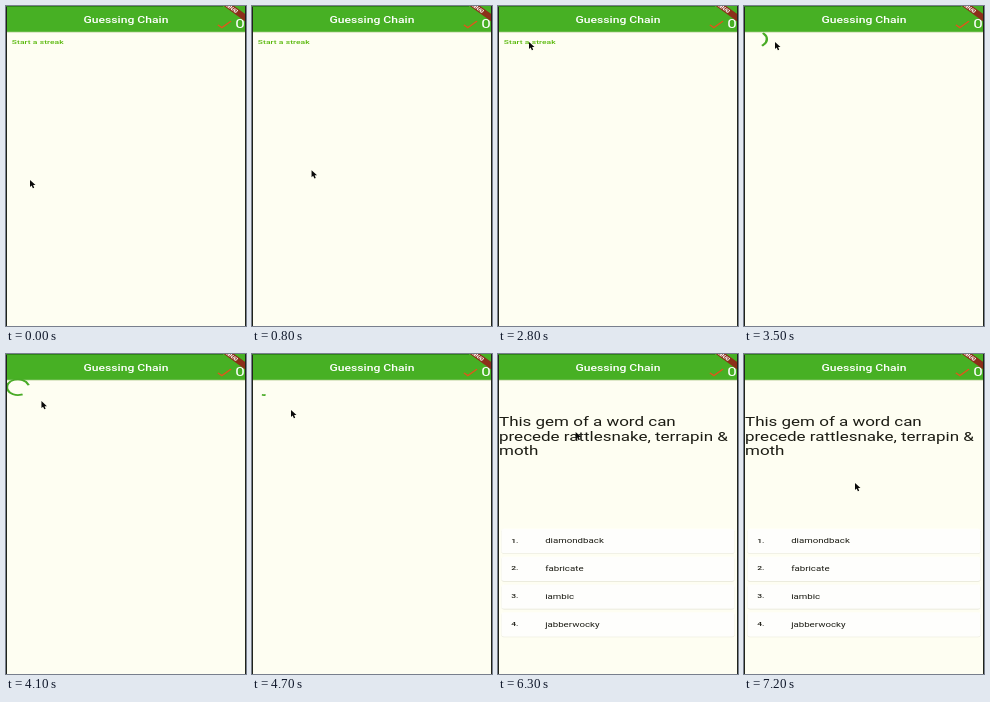
An HTML page for the animation above (8000 ms loop, 240x320 px).

```html
<!DOCTYPE html>
<html lang="en">
<head>
<meta charset="utf-8">
<title>Guessing Chain</title>
<style>
  html, body { margin: 0; width: 100%; height: 100%; overflow: hidden; background: #fefef2; }
  svg { display: block; }
  text { font-family: Roboto, "Open Sans", sans-serif; fill: #1c1c14; }
  .bar { fill: #fff; font-size: 20px; font-weight: 500; }
  .score { fill: #fff; font-size: 28px; }
  .start { fill: #58b80a; font-size: 14px; font-weight: 500; letter-spacing: .1px; }
  .clue { font-size: 28px; }
  .item { font-size: 16px; }
  .num { font-size: 14px; font-weight: 500; }
  .debug { fill: #fff; font-size: 10.2px; font-weight: 900; }
</style>
</head>
<body>
<svg width="240" height="320" viewBox="0 0 240 320">
  <!-- app layout in logical units -->
  <g transform="translate(1 1) scale(.607 .435)">
    <rect y="56" width="393" height="3" fill="#cfdfb4"/>
    <rect y="-3" width="393" height="60" fill="#47b024"/>
    <text class="bar" x="196" y="36.5" text-anchor="middle">Guessing Chain</text>
    <path transform="translate(342 24) scale(1.33)" fill="#e0561c"
      d="M9 16.17 4.83 12 3.41 13.41 9 19 21 7 19.59 5.59z"/>
    <text class="score" x="376" y="49">0</text>
    <g transform="translate(392 -24) rotate(45)">
      <rect x="-40" y="28" width="80" height="12" fill="#8c2f1a"/>
      <text class="debug" x="0" y="37.6" text-anchor="middle">DEBUG</text>
    </g>
    <text id="start" class="start" x="8" y="85">Start a streak</text>
    <circle id="spinner" cx="0" cy="0" r="18" pathLength="360" fill="none"
      stroke="#48ab26" stroke-width="4" stroke-linecap="square"/>
    <g id="quiz">
      <text class="clue" y="164">This gem of a word can</text>
      <text class="clue" y="196.8">precede rattlesnake, terrapin &amp;</text>
      <text class="clue" y="229.6">moth</text>
    </g>
  </g>
  <path d="M.5 0V320M239.5 0V320" stroke="#20241c"/>
  <path d="M0 .5H217" stroke="#2f8518"/>
  <path id="cursor" d="M0 0V7L1.6 5.6 2.9 8.2 4.2 7.7 3.1 5.1H5.5z" fill="#0a0a0a"/>
</svg>
<script>
const LOOP = 8000, STEP = 100;
const SPIN_FROM = 3264, QUIZ_FROM = 4900;
const SPIN_RATE = 1 / 1.2;
const $ = id => document.getElementById(id);

// time, x, y of the pointer tip
const path = [
  [0, 24, 174], [900, 64, 163], [1500, 91, 139], [1800, 35, 41], [2300, 31, 36],
  [3600, 31, 36], [4500, 39, 56], [4700, 39, 56], [5100, 43, 57], [5400, 43, 57],
  [5700, 86, 70], [5800, 86, 70], [6100, 67, 76], [6400, 83, 79], [6700, 83, 79],
  [7200, 111, 129], [LOOP, 111, 129]
];

$("quiz").innerHTML += ["diamondback", "fabricate", "iambic", "jabberwocky"].map((word, i) => `
  <g transform="translate(4 ${399.6 + 64 * i})">
    <rect y="1.5" width="384" height="56" rx="4" fill="#e6e6d8"/>
    <rect width="384" height="56" rx="4" fill="#fefefc"/>
    <text class="num" x="16" y="31.5">${i + 1}.</text>
    <text class="item" x="72" y="33.5">${word}</text>
  </g>`).join("");

function pointer(t) {
  const i = path.findIndex(p => p[0] > t);
  const [t0, x0, y0] = path[i - 1], [t1, x1, y1] = path[i];
  const k = (t - t0) / (t1 - t0);
  return [x0 + (x1 - x0) * k, y0 + (y1 - y0) * k];
}

// cubic-bezier(.4, 0, .2, 1), clamped to 0..1
function ease(x) {
  if (x <= 0) return 0;
  if (x >= 1) return 1;
  let lo = 0, hi = 1, s;
  for (let i = 0; i < 20; i++) {
    s = (lo + hi) / 2;
    const bx = 1.2 * s * (1 - s) ** 2 + .6 * s * s * (1 - s) + s ** 3;
    if (bx < x) lo = s; else hi = s;
  }
  return 3 * s * s - 2 * s ** 3;
}

function spin(ms) {
  const cycles = ms / 1333, p = cycles % 1;
  const head = 270 * ease(p * 2), tail = 270 * ease(p * 2 - 1);
  const angle = -90 + tail + 90 * p + 360 * ms / 2222;
  const arc = $("spinner");
  arc.setAttribute("transform", `translate(18 74) rotate(${angle})`);
  arc.setAttribute("stroke-dasharray", `${Math.max(head - tail, .1)} 360`);
}

function show(id, on) {
  $(id).style.display = on ? "" : "none";
}

function draw(now) {
  const t = Math.floor(now % LOOP / STEP) * STEP;
  show("start", t < SPIN_FROM);
  show("spinner", t >= SPIN_FROM && t < QUIZ_FROM);
  show("quiz", t >= QUIZ_FROM);
  spin(Math.max(0, t - SPIN_FROM) * SPIN_RATE);
  $("cursor").setAttribute("transform", `translate(${pointer(t)})`);
}

const begin = performance.now();
function tick() {
  draw(performance.now() - begin);
  requestAnimationFrame(tick);
}
tick();
</script>
</body>
</html>
```
